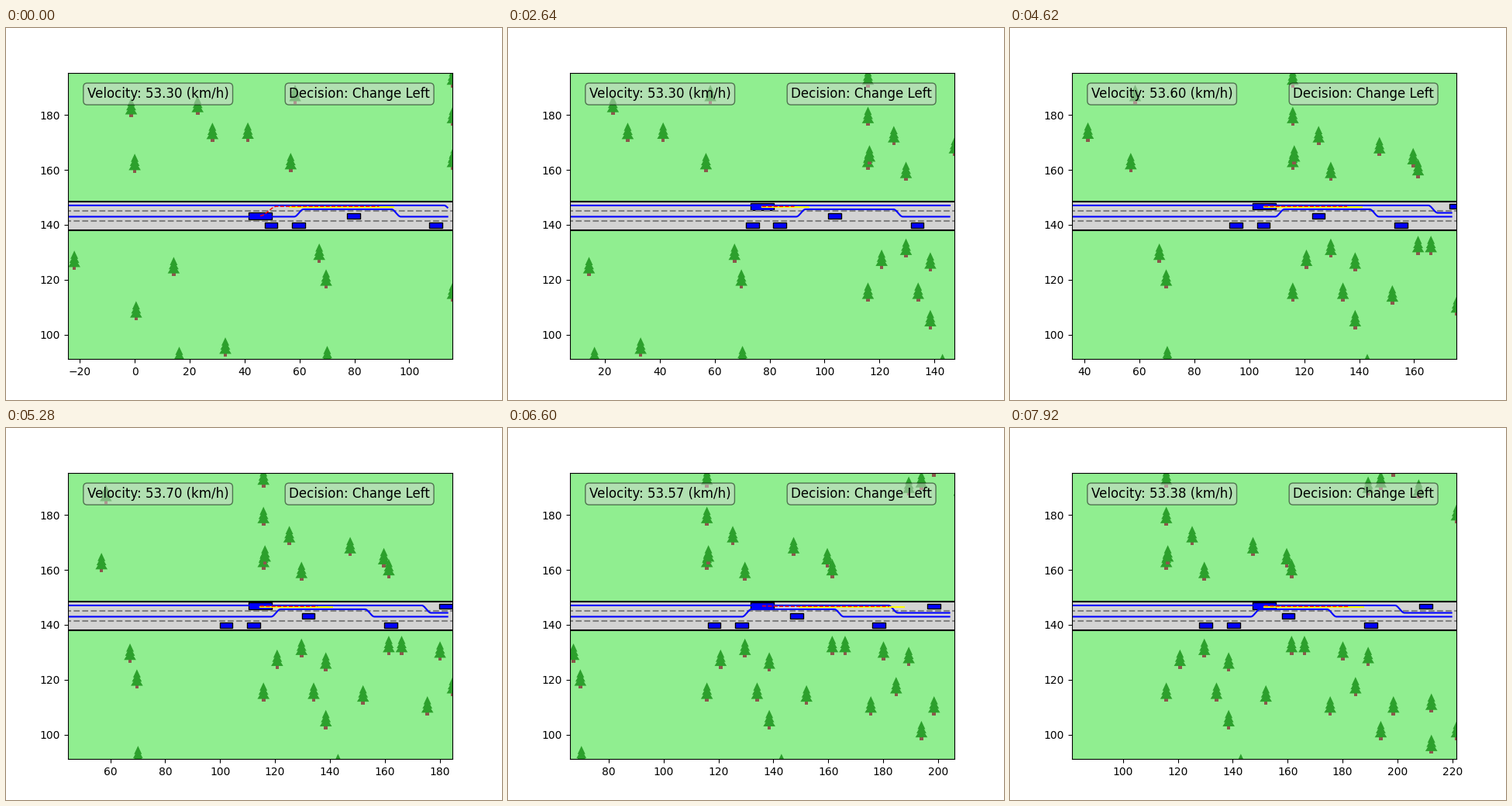
These frames come from a looping animation (640 by 480 pixels, 8 s). A matplotlib script:

```python
import matplotlib.pyplot as plt
import numpy as np
from matplotlib.animation import FuncAnimation
from matplotlib.collections import PolyCollection
from matplotlib.patches import Rectangle

TICK, LOOP, STEP = 50, 8000, 330
LAST = LOOP // STEP
REPLAN = 10
VIEW = 140
ROAD, LANE = 138, 3.5
CARS = [(0, 0), (10, 0), (30, 1), (60, 0), (80, 2)]  # gap, lane
CLEARANCE = 2.7  # how far the corridor bounds move to pass a car

# Trees in view at the start, then the heights of those met at each step.
START_TREES = [
    (-22, 123.6), (-1.3, 179.2), (0, 158.9), (0.5, 105.2), (14.2, 121.3),
    (16.2, 88.6), (22.9, 180), (28.3, 170.2), (33, 92), (41.2, 170.3),
    (56.8, 159.2), (58.4, 184), (67.2, 126.2), (69.7, 116.8), (70.1, 88.9)]
NEW_TREES = [
    (190, 176, 160, 112), (162,), (124,), (169,), (156, 128), (112,),
    (123, 102), (86,), (165,), (111,), (161,), (157, 129), (129,), (), (107,),
    (127,), (114,), (125, 187), (98, 189), (107, 194), (), (186,), (108, 93),
    (), (177, 98)]


def camera(k):
    """Left edge of the view; each replanning step runs slightly ahead."""
    cruise = np.interp(k, [0, 1, 8, 14, LAST], [-27.2, -23.75, 7.28, 35.4, 81.46])
    return cruise + 2.9 * (k % REPLAN == 0)


def lane_y(lane):
    return ROAD + LANE * (lane + 0.5)


def smooth(x, start, length=3.4):
    t = np.clip((x - start) / length, 0, 1)
    return t * t * (3 - 2 * t)


def corridor(k):
    """Where the bounds rise, fall and drop, measured from the left edge."""
    plan, age = divmod(k, REPLAN)
    if plan == 0:
        return 82.4, 117.8, 137 + 0.16 * age
    if plan == 1:
        return 74, 108.8 - 0.1 * age, 131.7 - 0.48 * age
    return 62.7 + 0.6 * age, 96.3 - 0.85 * age, 116 + 0.42 * age


def tree_shapes(x, y):
    trunk = [(x - .65, y), (x + .65, y), (x + .65, y + 1.8), (x - .65, y + 1.8)]
    crown = []
    for i in range(3):
        w, lo, hi = 2.2 - .4 * i, 1 + 1.5 * i, 4.6 + 1.2 * i
        crown.append([(x - w, y + lo), (x + w, y + lo), (x, y + hi)])
    return [trunk] + crown


def vehicle(length, width):
    box = Rectangle((0, 0), length, width, rotation_point="center",
                    facecolor="blue", edgecolor="black")
    return ax.add_patch(box)


def place(box, x, y):
    box.set_xy((x - box.get_width() / 2, y - box.get_height() / 2))


fig, ax = plt.subplots(figsize=(6.4, 4.8), dpi=100)
ax.set_facecolor("lightgreen")
half = VIEW * 369.6 / 496 / 2
ax.set_ylim(lane_y(1) - half, lane_y(1) + half)
for axis in (ax.xaxis, ax.yaxis):
    axis.set_major_locator(plt.MultipleLocator(20))

ax.add_patch(Rectangle((-500, ROAD), 1500, 3 * LANE, color="lightgray", lw=0))
for i in range(4):
    style = dict(color="black") if i in (0, 3) else dict(color="gray", ls="--")
    ax.plot([-500, 1000], [ROAD + LANE * i] * 2, lw=1.5, **style)

trees = START_TREES + [(camera(k) + VIEW + 0.1, y)
                       for k, row in enumerate(NEW_TREES) for y in row]
shapes = [s for t in trees for s in tree_shapes(*t)]
ax.add_collection(PolyCollection(
    shapes, facecolors=["#8c564b"] + ["#2ca02c"] * 3, edgecolors="none"),
    autolim=False)

cars = [vehicle(4.7, 1.95) for _ in CARS]
truck = vehicle(8.2, 2.5)
upper, = ax.plot([], [], color="blue", lw=1.5)
lower, = ax.plot([], [], color="blue", lw=1.5)
path, = ax.plot([], [], color="yellow", lw=1.5)
track, = ax.plot([], [], "--", color="red", lw=1)

label = dict(transform=ax.transAxes, fontsize=12, va="top",
             bbox=dict(boxstyle="round", facecolor="lightgray", alpha=0.5))
speed = ax.text(0.05, 0.95, "", **label)
ax.text(0.575, 0.95, "Decision: Change Left", **label)


def update(frame):
    k = min((frame * TICK + TICK - 1) // STEP, LAST)
    left = camera(k)
    ego = left + VIEW / 2
    ax.set_xlim(left, left + VIEW)
    kmh = np.interp(k, [0, 4, 8, 14, 18, 20, LAST],
                    [53.3, 50.17, 53.3, 53.6, 53.8, 53.57, 53.38])
    speed.set_text(f"Velocity: {kmh:.2f} (km/h)")

    # Traffic drives at a steady fraction of the truck's speed.
    lead = 49.65 + 0.762 * (left - camera(0))
    for box, (gap, lane) in zip(cars, CARS):
        place(box, lead + gap, lane_y(lane))

    ego_y = lane_y(1) + 3.3 * smooth(k, 0, 8) + 0.015 * k
    place(truck, ego, ego_y)
    truck.set_angle(8 * np.sin(np.pi * min(k / 8, 1)))

    rise, fall, drop = corridor(k)
    x = np.linspace(-10, 138.2, 500)
    lower.set_data(left + x, ROAD + LANE + 1.45
                   + CLEARANCE * (smooth(x, rise) - smooth(x, fall)))
    upper.set_data(left + x, ROAD + 3 * LANE - 1.45 - CLEARANCE * smooth(x, drop))

    goal = 94.3 + 46.6 * (k // REPLAN)
    path.set_data([max(ego, goal - 38), goal], [146.5, 146.5])
    x = np.linspace(ego, goal - 5.3, 200)
    track.set_data(x, ego_y + (146.7 - ego_y) * smooth(x, ego, 6))


anim = FuncAnimation(fig, update, frames=LOOP // TICK, interval=TICK,
                     init_func=lambda: update(0), repeat=True, repeat_delay=0)
plt.show()
```
